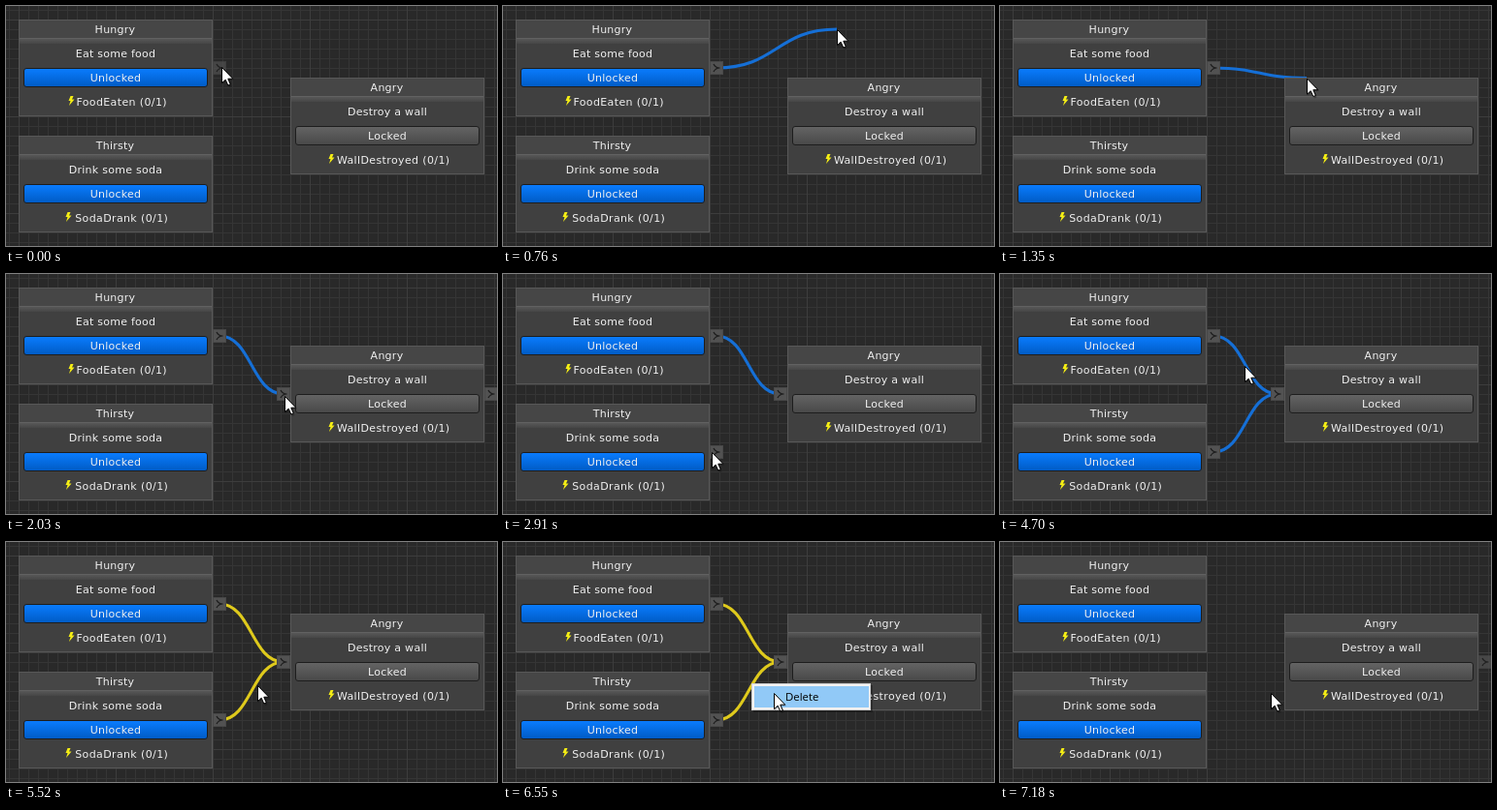
These frames come from a looping animation (506x248 px, 7.78 s). An HTML page:

```html
<!DOCTYPE html>
<html lang="en">
<head>
<meta charset="utf-8">
<title>Node graph</title>
<style>
  html, body { margin: 0; width: 100%; height: 100%; overflow: hidden; background: #292929; }
  svg { display: block; width: 506px; height: 248px; }
  .label { font: 11px "DejaVu Sans", sans-serif; letter-spacing: .26px; fill: #f0f0f0; text-anchor: middle; }
  .event { letter-spacing: .38px; }
  .wire { fill: none; stroke-width: 3; }
  #menu text { font: 11.4px "Open Sans", sans-serif; fill: #000; }
</style>
</head>
<body>
<svg viewBox="0 0 506 248">
  <defs>
    <pattern id="minor" x="3" y="4" width="10" height="10" patternUnits="userSpaceOnUse">
      <path d="M.5 0V10M0 .5H10" stroke="#353535"/>
    </pattern>
    <pattern id="major" x="13" y="14" width="100" height="100" patternUnits="userSpaceOnUse">
      <path d="M.5 0V100M0 .5H100" stroke="#3d3d3d" fill="none"/>
    </pattern>
    <linearGradient id="blue" x2="0" y2="1">
      <stop stop-color="#0a7cff"/><stop offset="1" stop-color="#005bc4"/>
    </linearGradient>
    <linearGradient id="gray" x2="0" y2="1">
      <stop stop-color="#646464"/><stop offset="1" stop-color="#484848"/>
    </linearGradient>
    <linearGradient id="strip" x2="0" y2="1">
      <stop stop-color="#5a5a5a"/><stop offset="1" stop-color="#464646"/>
    </linearGradient>
    <g id="port">
      <rect x=".5" y=".5" width="13" height="13" fill="#525252" stroke="#484848"/>
      <path d="M4 3Q6 7 10.5 7Q6 7 4 11" fill="none" stroke="#1c1c1c" stroke-width="1.2"/>
    </g>
  </defs>
  <rect width="506" height="248" fill="#292929"/>
  <rect width="506" height="248" fill="url(#minor)"/>
  <rect width="506" height="248" fill="url(#major)"/>
  <path id="wireA" class="wire"/>
  <path id="wireB" class="wire"/>
  <use id="outA" href="#port" x="213" y="57"/>
  <use id="outB" href="#port" x="213" y="177"/>
  <use id="inC" href="#port" x="279" y="117"/>
  <use id="outC" href="#port" x="493" y="117"/>
  <g id="nodes"></g>
  <g id="menu">
    <rect x="258" y="148" width="123" height="28" fill="#000" opacity=".3"/>
    <rect x="256.5" y="146.5" width="122" height="27" fill="#f2f2f2" stroke="#cfcfcf"/>
    <rect id="item" x="259" y="149" width="118" height="22" fill="#91c9f7"/>
    <text x="291" y="164">Delete</text>
  </g>
  <g id="cursor">
    <path d="M1 2V18L5 14.5L8 21L10.5 20L8 13.5H13Z" fill="#000" opacity=".25"/>
    <path d="M.5 .5V16.6L4.2 13.2L6.8 19L9.3 18L6.8 12.2H11.8Z" fill="#fff" stroke="#000"/>
  </g>
</svg>
<script>
const LOOP = 7780;
const BLUE = "#156fd6", YELLOW = "#dfca1c";
const $ = id => document.getElementById(id);

function node(x, y, title, task, state, event, boltX) {
  const fill = state === "Locked" ? "gray" : "blue";
  const label = (cx, cy, s, kind = "") => `<text class="label ${kind}" x="${cx}" y="${cy}">${s}</text>`;
  return `<g transform="translate(${x} ${y})">
    <rect x=".5" y=".5" width="199" height="99" fill="#404040" stroke="#585858"/>
    <rect x="1" y="1" width="198" height="18" fill="#464646"/>
    <rect x="1" y="19" width="198" height="6" fill="url(#strip)"/>
    <path d="M1 19.5H199" stroke="#616161"/>
    <rect x="5.5" y="50.5" width="189" height="19" rx="2.5" fill="url(#${fill})" stroke="#1d1d1d"/>
    <path transform="translate(${boltX} 79)" d="M2.5 0H5.5L4 3.5H6.5L1 10L2.5 5H.5Z" fill="#f5ee14"/>
    ${label(99.5, 14, title)}${label(100, 39, task)}${label(100, 64, state)}${label(106.2, 89, event, "event")}
  </g>`;
}

$("nodes").innerHTML =
  node(13, 14, "Hungry", "Eat some food", "Unlocked", "FoodEaten (0/1)", 51) +
  node(13, 134, "Thirsty", "Drink some soda", "Unlocked", "SodaDrank (0/1)", 48) +
  node(293, 74, "Angry", "Destroy a wall", "Locked", "WallDestroyed (0/1)", 39);

// Cursor moves: first step, last step, number of steps, destination
const moves = [
  [460, 760, 5, 344, 24],
  [990, 1650, 10, 288, 125],
  [1790, 1790, 1, 287, 126],
  [2170, 2610, 7, 213, 184],
  [2750, 2910, 3, 215, 184],
  [3050, 3410, 6, 395, 105],
  [4180, 4550, 6, 254, 95],
  [4700, 4700, 1, 252, 95],
  [5000, 5290, 5, 259, 148],
  [5660, 5740, 2, 257, 146],
  [6330, 6550, 4, 279, 156]
];

// Share of n evenly spaced steps already taken
function stepped(t, from, to, n) {
  if (t < from) return 0;
  if (t >= to) return 1;
  return (Math.floor((t - from) / (to - from) * (n - 1) + 1e-6) + 1) / n;
}

function cursorAt(t) {
  let x = 222, y = 63;
  for (const [from, to, n, nx, ny] of moves) {
    const p = stepped(t, from, to, n);
    x += (nx - x) * p;
    y += (ny - y) * p;
    if (p < 1) break;
  }
  return [x, y];
}

// Wires run between port centres, hidden beneath the ports
function wire(id, y, end, color) {
  const x = 220, [ex, ey] = end, mid = (x + ex) / 2;
  $(id).setAttribute("d", `M${x} ${y}C${mid} ${y} ${mid} ${ey} ${ex} ${ey}`);
  $(id).setAttribute("stroke", color);
}

const within = (t, from, to) => t >= from && t < to;
const fade = (id, opacity) => $(id).setAttribute("opacity", +opacity);

function draw(t) {
  const tip = cursorAt(t), socket = [286, 124];
  $("cursor").setAttribute("transform", `translate(${tip})`);

  wire("wireA", 64, t < 2030 ? tip : socket, t < 4860 ? BLUE : YELLOW);
  wire("wireB", 184, t < 3800 ? tip : socket, t < 5520 ? BLUE : YELLOW);
  fade("wireA", within(t, 460, 6947));
  fade("wireB", within(t, 3050, 6947));

  fade("outA", t < 460 ? .7 : t < 6947);
  fade("outB", within(t, 2536, 6947));
  fade("inC", within(t, 2030, 6947));
  fade("outC", within(t, 2030, 2240) || within(t, 3800, 4476) || .75 * stepped(t, 7025, 7180, 3));

  fade("menu", t < 6870 ? stepped(t, 5970, 6110, 3) : 0);
  fade("item", t >= 6330);
}

const start = performance.now();
function tick() {
  draw((performance.now() - start) % LOOP);
  requestAnimationFrame(tick);
}
tick();
</script>
</body>
</html>
```
